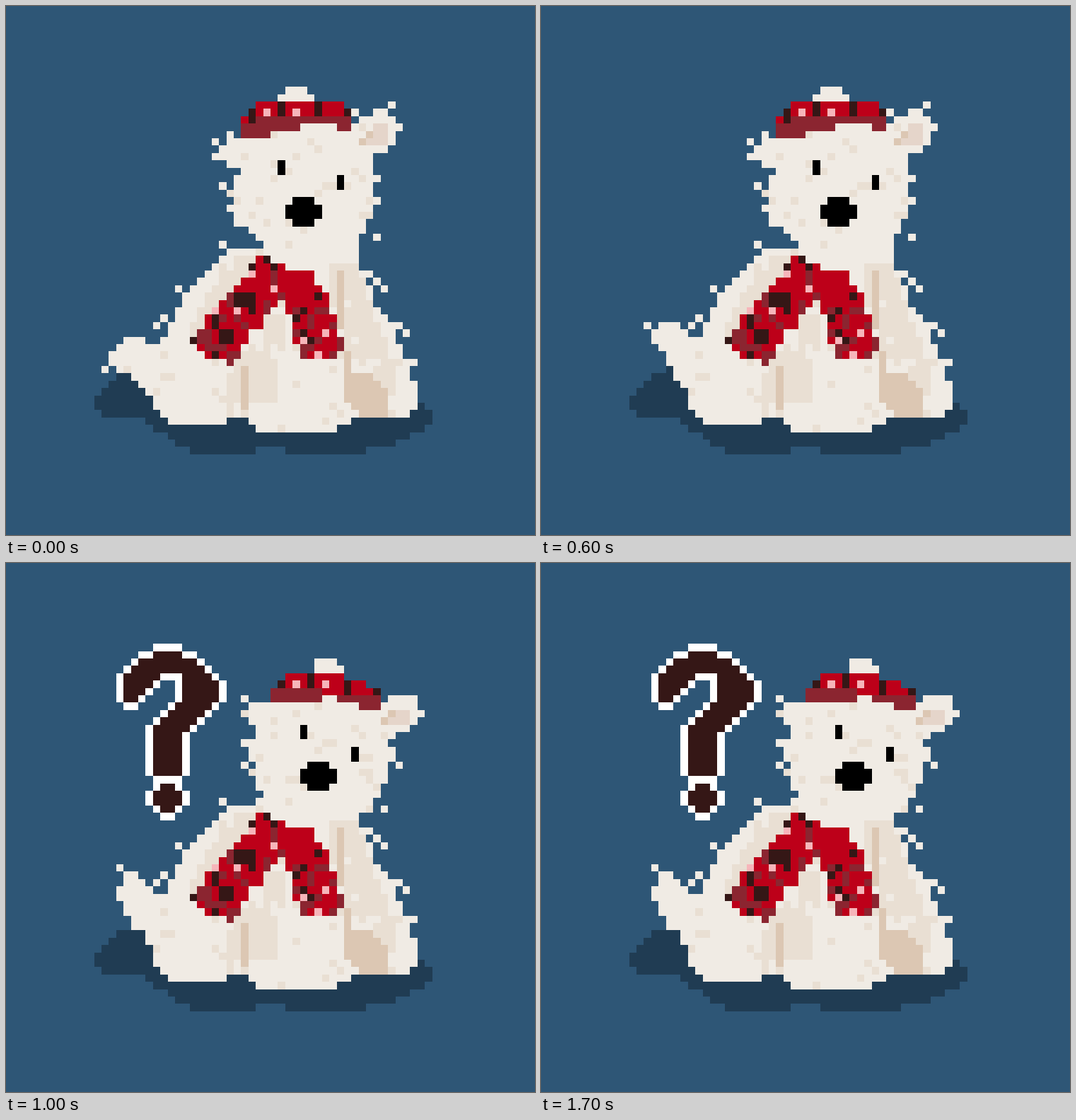
These frames come from a looping animation (748 px wide and 748 px high, 1.8 s). An HTML page with a canvas:

```html
<!DOCTYPE html>
<html lang="en">
<head>
<meta charset="utf-8">
<title>Curious dog</title>
<style>
  html, body { margin: 0; width: 100%; height: 100%; overflow: hidden; background: #2e5676; }
  canvas { display: block; width: 100vw; height: 100vh; image-rendering: pixelated; }
</style>
</head>
<body>
<canvas id="stage" width="72" height="72"></canvas>
<script>
const SIZE = 72, STEP = 100, STEPS = 18;
const BG = '#2e5676', SHADOW = '#203c53', FUR = '#f0ebe4', SHADE = '#e9dfd3', TAN = '#dcc7b3',
      RED = '#bd0019', WINE = '#8b2530', BROWN = '#351716', PINK = '#f6b5ba', EAR = '#e5d5ca';

// Repeatable noise in 0..1 for a cell
const noise = (x, y) => {
  const n = Math.sin(x * 12.9898 + y * 78.233) * 43758.5453;
  return n - Math.floor(n);
};

// Textures: cell -> colour
const fur = (x, y) => noise(x, y) < .05 ? SHADE : FUR;
const fold = (x, y) => noise(x, y) < .06 ? FUR : SHADE;
const plaid = (x, y) => {
  const n = noise(x, y), knot = Math.abs(x - 39.5) < 2 && y < 41;
  return knot || n < .56 ? RED : n < .84 ? WINE : n < .92 ? BROWN : PINK;
};
const tartan = (dx, dy) => (x, y) => {
  const phase = (x - dx - 32.5) % 4.4;
  return phase >= 0 && phase < 1 ? BROWN : y === 14 + dy && phase > 2 && phase < 2.6 ? PINK : RED;
};

function layer(paint) {
  const c = document.createElement('canvas');
  c.width = c.height = SIZE;
  const g = c.getContext('2d');

  // Fill every cell whose centre lies inside the outline, without soft edges.
  const shape = (fill, d) => {
    const p = new Path2D(d);
    for (let y = 0; y < SIZE; y++)
      for (let x = 0; x < SIZE; x++) {
        if (!g.isPointInPath(p, x + .5, y + .5)) continue;
        g.fillStyle = typeof fill === 'function' ? fill(x, y) : fill;
        g.fillRect(x, y, 1, 1);
      }
  };
  const box = (color, x, y, w, h) => {
    g.fillStyle = color;
    g.fillRect(x, y, w, h);
  };
  const dots = (color, list) => {
    for (const [x, y] of list) box(color, x, y, 1, 1);
  };
  paint({ shape, dots, box, g });
  return c;
}

const ground = layer(({ shape, box }) => {
  box(BG, 0, 0, SIZE, SIZE);
  shape(SHADOW, 'M17 49H22V54H56V54H57V55H58V57H57V58H55V59H53V60H49V61H38V60H34V61H25V60H23V59H22V58H20V57H19V56H13V55H12V53H13V52H14V51H15V50H17Z');
});

const tails = [
  { d: 'M16 45H19V46H20V47H22V54H20V53H19V52H18V51H17V50H15V49H14V47H15V46H16Z', tuft: [13, 49] },
  { d: 'M16 43H19V44H20V45H22V54H20V52H19V51H18V49H17V47H16V46H15V44H16Z', tuft: [14, 43] },
  { d: 'M16 42H18V43H19V44H20V45H22V54H20V52H19V50H18V48H17V47H16V46H15V44H16Z', tuft: [14, 45] },
  { d: 'M16 42H18V43H19V44H20V45H21V46H22V54H20V52H19V50H17V48H16V46H15V44H16Z', tuft: [15, 41] }
].map(({ d, tuft }) => layer(({ shape, dots }) => {
  shape(fur, d);
  dots(FUR, [tuft]);
}));

const body = layer(({ shape, dots }) => {
  shape(fur, 'M30.6 33H48V36H49V38H50V41H51V42H52V43H53V46H54V48H55V51H56V55H55V56H47V57H45V58H34V57H33V56H30V57H22V56H21V55H20V52H19V47H20V46H21V45H22V43H23V41H24V39H24.6Z');
  dots(FUR, [[29, 32], [23, 38], [21, 42], [20, 43], [49, 36], [50, 37], [51, 38], [53, 43], [54, 44], [55, 48]]);

  // Folds: shoulder, hind leg, chest, flank
  shape(fold, 'M31 34H34V36L28 42L25 46V44L27 40L30 37Z');
  shape(fold, 'M30 47H33V56H30Z');
  shape(fold, 'M35 42H38V47H37V54H33V46H35Z');
  shape(fold, 'M44 35H48L50 42L53 49V53L50 50L47 48H46V42H44Z');
  shape(TAN, 'M32 49H33V55H32Z M45 36H46V44H45Z M46 47H47V50H49L52 53V56H49L46 53Z');
});

const scarf = layer(({ shape, box }) => {
  shape(plaid, 'M34 34H36V35H38V36H42V38H43V39H44V42H45V45H46V47H45V48H40V46H39V42H38V40H37V41H36V42H35V44H33V46H32V48H31V49H30V48H27V47H26V46H25V45H26V44H27V42H28V41H29V40H30V39H31V38H32V37H33V35H34Z');
  box(BROWN, 31, 39, 3, 2);
  box(BROWN, 29, 44, 2, 2);
});

const heads = [
  {
    head: 'M30 17H31V18H33V16H48V15H50V14H52V15H53V16H54V17H53V19H52V20H50V29H49V31H48V35H35V32H34V31H33V30H32V30H31V28H30V27H31V26H30V25H31V23H32V22H30V21H28V20H29V19H30Z',
    tufts: [[28, 18], [29, 24], [52, 13], [47, 14], [50, 23], [50, 26], [50, 31]],
    ear: 'M50 16H52V19H49V18H50Z', inner: [[49, 17], [48, 18]],
    pom: 'M38 11H41V12H42V13H37V12H38Z',
    cap: 'M34 13H46V14H47V16H32V15H33V14H34Z',
    band: 'M34 15H47V17H45V16H40V17H36V18H32V16H34Z',
    check: tartan(0, 0),
    nose: 'M39 26H42V27H43V29H42V30H39V29H38V27H39Z',
    eyes: [[37, 21], [45, 23]]
  },
  {
    head: 'M34 17H35V18H57V19H56V20H58V21H56V22H55V23H53V27H52V30H51V32H50V33H49V34H48V35H34V30H33V27H32V26H33V25H32V24H34V22H33V21H32V18H34Z',
    tufts: [[51, 17], [56, 17], [56, 23]],
    ear: 'M53 20H56V21H54V22H52V21H53Z', inner: [[52, 22]],
    pom: 'M43 13H46V15H43Z',
    cap: 'M39 14H43V15H49V16H50V17H36V16H37V15H39Z',
    band: 'M37 16H43V17H51V18H50V20H49V19H48V18H40V19H38V18H36V17H37Z',
    check: tartan(4, 1),
    nose: 'M40 27H45V29H44V30H43V31H41V30H40Z',
    eyes: [[40, 22], [47, 25]]
  },
  {
    head: 'M33 19H36V18H51V19H52V18H56V20H57V21H56V22H55V23H53V24H52V25H53V27H52V30H51V32H50V34H48V35H34V32H35V31H34V29H33V28H34V27H33V24H34V22H33V21H32V20H33Z',
    tufts: [[32, 18], [32, 24], [32, 27], [53, 27], [51, 33]],
    ear: 'M53 20H55V22H52V21H53Z', inner: [[52, 20], [51, 21]],
    pom: 'M42 13H45V14H46V16H42Z',
    cap: 'M38 15H46V16H49V17H51V18H36V17H37V16H38Z',
    band: 'M36 17H43V18H51V20H48V19H45V18H43V19H36Z',
    check: tartan(4, 2),
    nose: 'M41 27H44V28H45V30H44V31H41V30H40V28H41Z',
    eyes: [[40, 22], [47, 25]]
  }
].map(p => layer(({ shape, dots, box }) => {
  shape(fur, p.head);
  dots(FUR, p.tufts);
  shape(EAR, p.ear);
  dots(TAN, p.inner);
  shape(FUR, p.pom);
  shape(p.check, p.cap);
  shape(WINE, p.band);
  for (const [x, y] of p.eyes) {
    box('#000', x, y, 1, 2);
    box(SHADE, x + 1, y + 1, 1, 1);
  }
  shape('#000', p.nose);
}));

const mark = layer(({ g }) => {
  const glyph = layer(({ shape }) => shape(BROWN,
    'M20 12H24V13H26V14H27V15H28V16H29V19H28V20H27V21H26V22H25V23H24V29H20V22H21V21H22V20H23V19H24V15H21V16H20V17H19V18H18V19H16V15H17V14H18V13H20Z M21 30H23V31H24V33H23V34H21V33H20V31H21Z'));
  // White rim: the glyph nudged one cell each way
  for (const [x, y] of [[1, 0], [-1, 0], [0, 1], [0, -1]]) g.drawImage(glyph, x, y);
  g.globalCompositeOperation = 'source-in';
  g.fillStyle = '#fff';
  g.fillRect(0, 0, SIZE, SIZE);
  g.globalCompositeOperation = 'source-over';
  g.drawImage(glyph, 0, 0);
});

const TURN = 7, ASK = 8;               // steps at which the head tilts, then the mark pops up
const wag = [0, 1, 2, 3, 1];           // tail pose per step, held high once the mark shows
const ctx = document.getElementById('stage').getContext('2d');
let shown = -1;

function draw(step) {
  const asking = step >= ASK;
  const tail = tails[asking ? 3 : wag[step % wag.length]];
  const head = heads[asking ? 2 : step >= TURN ? 1 : 0];
  for (const part of [ground, tail, body, head, scarf]) ctx.drawImage(part, 0, 0);
  if (asking) ctx.drawImage(mark, 0, 0);
}

const start = performance.now();
function tick() {
  const step = Math.floor((performance.now() - start) / STEP) % STEPS;
  if (step !== shown) draw(shown = step);
  requestAnimationFrame(tick);
}
tick();
</script>
</body>
</html>
```
